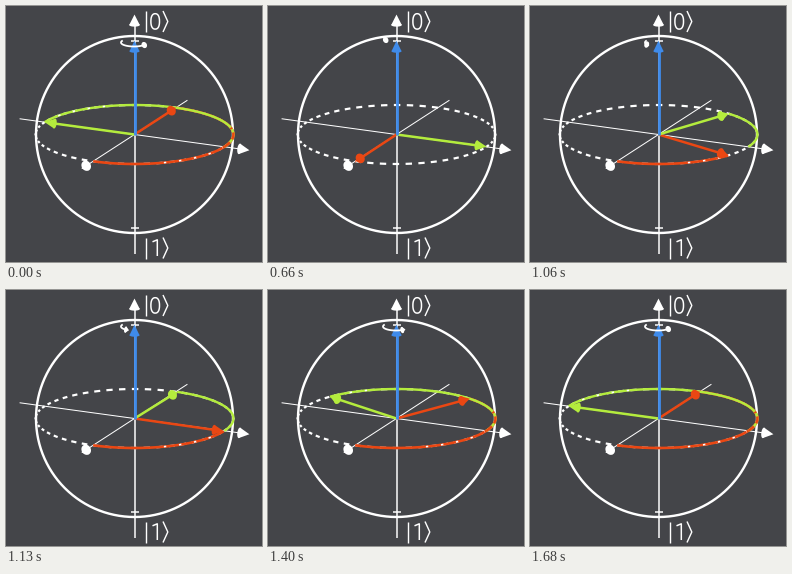
A matplotlib script for the animation above (2020 ms loop, 256 by 256 pixels).

```python
import numpy as np
import matplotlib.pyplot as plt
from matplotlib.animation import FuncAnimation
from matplotlib.patches import Polygon

SIZE, DPI = 256, 64
PX = 72 / DPI
LOOP, TICK = 2020, 10
BG, WHITE = "#444549", "#ffffff"
BLUE, GREEN, RED = "#3f8bea", "#b4ec3d", "#ea4713"

C = np.array([128.5, 128.5])
R = 98.5
# Screen projections of the three unit axes
X = np.array([-0.42, 0.272])
Y = np.array([0.912, 0.125])
Z = np.array([0.0, -0.952])

RESET, START, DONE = 130, 660, 1680
STEPS = START + np.array([0, 70, 140, 200, 270, 340, 400, 470, 530,
                          600, 670, 740, 810, 870, 940, 1020])

fig = plt.figure(figsize=(SIZE / DPI, SIZE / DPI), dpi=DPI, facecolor=BG)
ax = fig.add_axes([0, 0, 1, 1])
ax.set(xlim=(0, SIZE), ylim=(SIZE, 0))
ax.axis("off")


def line(points=((), ()), color=WHITE, width=1.0, z=2, **kw):
    kw.setdefault("solid_capstyle", "butt")
    return ax.plot(*points, color=color, lw=width * PX, zorder=z, **kw)[0]


def segment(a, b):
    return np.array([a, b]).T


def equator(angles):
    """Points on the equator for angles in degrees, as x and y rows."""
    a = np.radians(np.atleast_1d(angles))
    return C[:, None] + R * (np.outer(X, np.cos(a)) + np.outer(Y, np.sin(a)))


class Cone:
    """Silhouette of a solid arrowhead."""

    def __init__(self, color, height, radius, z):
        self.height, self.radius = height, radius
        self.parts = [ax.add_patch(Polygon(np.zeros((3, 2)), fc=color,
                                           ec="none", zorder=z))
                      for _ in range(2)]

    def place(self, tip, v):
        base = tip - self.height * v
        size = np.hypot(*v)
        along = v / size
        across = np.array([-along[1], along[0]]) * self.radius
        depth = self.radius * np.sqrt(max(0, 1 - size ** 2))
        a = np.linspace(0, 2 * np.pi, 40)[:, None]
        self.parts[0].set_xy(base + np.cos(a) * across
                             + np.sin(a) * depth * along)
        self.parts[1].set_xy([base + across, tip, base - across])
        return base


class Arrow:
    def __init__(self, color, width, z):
        self.shaft = line(color=color, width=width, z=z)
        self.head = Cone(color, 11, 5, z + 0.1)

    def point(self, v):
        base = self.head.place(C + R * v, v)
        self.shaft.set_data(*segment(C, base))


def ket(digit, top):
    """Thin-stroked digit between a bar and an angle bracket."""
    line(([140.2, 140.2], [top, top + 21]), width=1.4)
    line(([157, 161.8, 157], [top, top + 10.5, top + 21]), width=1.4)
    if digit:
        line(([146.5, 151.3, 151.3], [top + 4.3, top + 2.3, top + 18.5]),
             width=1.5)
    else:
        a = np.linspace(0, 2 * np.pi, 60)
        c, s = np.cos(a), np.sin(a)
        line((149.2 + 4.3 * np.sign(c) * abs(c) ** 0.85,
              top + 10.4 + 7.7 * np.sign(s) * abs(s) ** 0.85), width=1.5)


# Sphere, axes and labels
ring = np.radians(np.linspace(0, 360, 241))
line((C[0] + R * np.cos(ring), C[1] + R * np.sin(ring)), width=2.4)
for start in np.arange(0, 360, 7.5):
    line(equator(np.linspace(start, start + 3.75, 5)), width=2.2)
for axis, width in ((X, 1), (Y, 1), (Z, 1.5)):
    cone = Cone(WHITE, 11, 5.3, 3)
    base = cone.place(C + 126 * axis, axis)
    line(segment(C - 126 * axis, base), width=width, z=3)
for side in (1, -1):
    y = C[1] + side * R * Z[1]
    line(([124.5, 132.5], [y, y]), width=1.5, z=3)
ket(0, 5)
ket(1, 231.5)

# Moving parts
red_trail = line(color=RED, width=2.6, z=4)
green_trail = line(color=GREEN, width=2.4, z=5)
overlap = line(color=RED, width=2.4, z=5.1, dashes=(3, 1.5))
glints = [line(color=WHITE, width=1.6, z=5.2, dashes=(1.5, 8))
          for _ in range(2)]
red, green = Arrow(RED, 2.5, 6), Arrow(GREEN, 2.5, 7)
blue = Arrow(BLUE, 2.8, 8)
blue.point(Z)
spin_arc = line(width=1.8, z=9)
spin_head = Cone(WHITE, 4, 3.2, 9.1)


def arc(artist, first, last):
    if last > first:
        artist.set_data(*equator(np.linspace(first, last, 90)))
    else:
        artist.set_data([], [])


def spin_point(a):
    return np.array([C[0] - 0.5 + 13 * np.cos(a), 36.5 - 4 * np.sin(a)])


def angle_at(ms):
    """Rotation in degrees, held between the coarse steps."""
    if ms < RESET or ms >= DONE:
        return 180.0
    if ms < START:
        return 0.0
    held = STEPS[STEPS <= ms][-1]
    u = min(1, (held - START + 27) / 1000)
    return 90 * (1 - np.cos(np.pi * u))


def draw(i):
    deg = angle_at(i * TICK)
    a = np.radians(deg)
    red.point(np.cos(a) * X + np.sin(a) * Y)
    green.point(np.cos(a) * Y - np.sin(a) * X)
    arc(red_trail, 0, deg)
    arc(green_trail, 90, 90 + deg)
    arc(overlap, 90, min(deg, 128))
    arc(glints[0], 42, min(deg - 5, 88))
    arc(glints[1], 222, min(deg + 82, 262))

    s = np.radians(150 + deg)
    p = spin_point(s)
    v = np.array([-np.sin(s), -0.305 * np.cos(s)])
    spin_head.place(p + 2 * v, v)
    spin_arc.set_data(*spin_point(np.linspace(np.radians(150), s, 50)))
    return []


anim = FuncAnimation(fig, draw, frames=LOOP // TICK, interval=TICK,
                     init_func=lambda: draw(0), repeat=True, repeat_delay=0,
                     blit=False)
plt.show()
```
